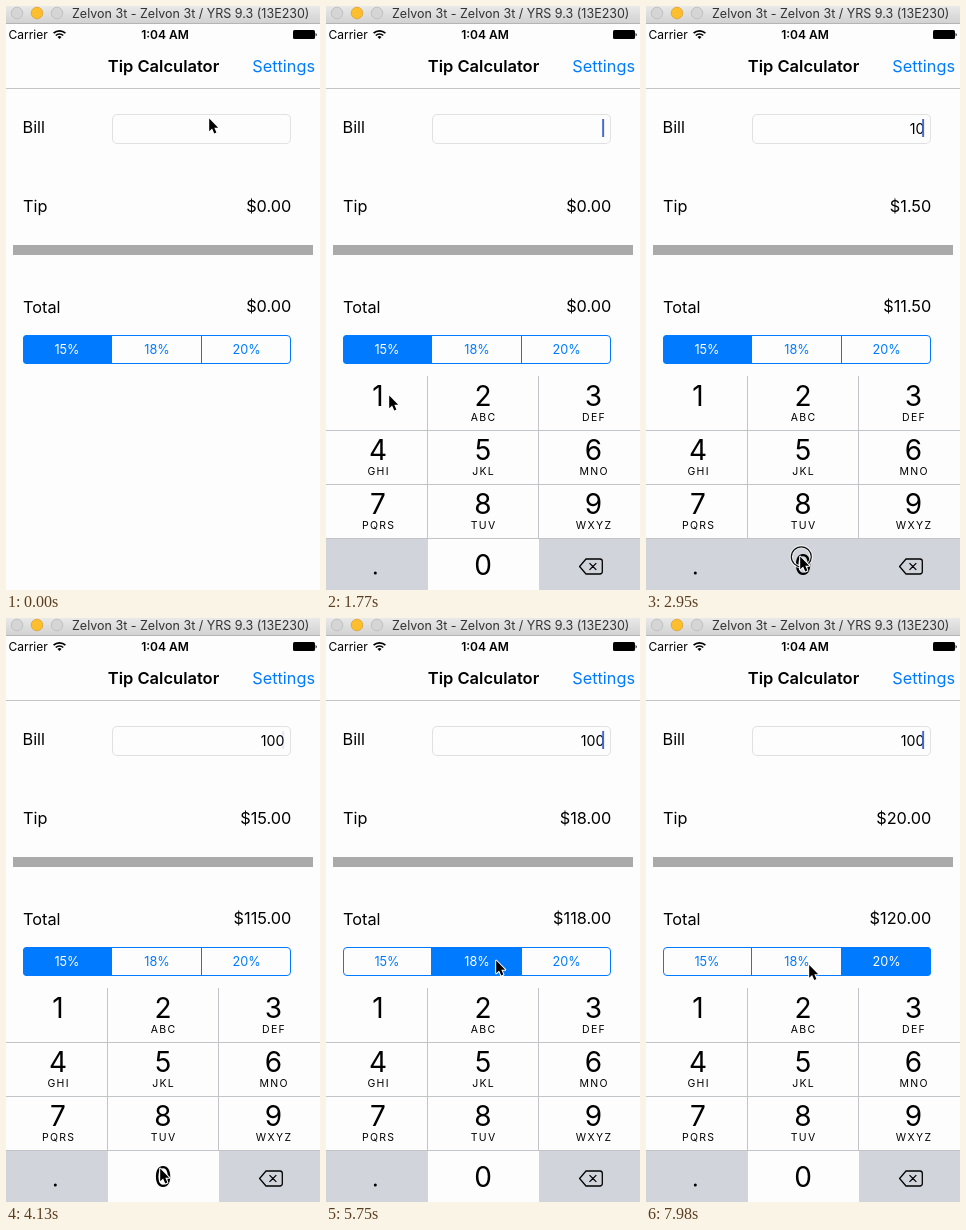
An HTML page for the animation above (8000 ms loop, 314 by 584 pixels).

```html
<!DOCTYPE html>
<html lang="en">
<head>
<meta charset="utf-8">
<title>Tip Calculator</title>
<style>
  html, body { margin: 0; width: 100%; height: 100%; overflow: hidden; background: #fdfdfd; }
  svg { display: block; width: 314px; height: 584px; }
  text { font-family: Inter, Roboto, sans-serif; font-size: 16.3px; fill: #000; white-space: pre; }
  .right { text-anchor: end; }
  .mid, .digit, .abc, .seg { text-anchor: middle; }
  .digit { font-size: 28px; }
  .abc { font-size: 10.5px; letter-spacing: 1.3px; }
  .seg { font-size: 12.7px; }
</style>
</head>
<body>
<svg id="stage" viewBox="0 0 314 584" xmlns="http://www.w3.org/2000/svg">
  <defs>
    <linearGradient id="chrome" x2="0" y2="1">
      <stop offset="0" stop-color="#e9e9e9"/><stop offset="1" stop-color="#d2d2d2"/>
    </linearGradient>
    <clipPath id="segClip"><rect x="17" y="329" width="268" height="29" rx="4"/></clipPath>
  </defs>
  <rect width="314" height="584" fill="#fdfdfd"/>

  <!-- window bar -->
  <rect width="314" height="17" fill="url(#chrome)"/>
  <rect y="17" width="314" height="1" fill="#b4b4b4"/>
  <g stroke-width=".8">
    <circle cx="11" cy="7" r="5.8" fill="#d5d5d5" stroke="#bcbcbc"/>
    <circle cx="31" cy="7" r="5.8" fill="#fdbf2d" stroke="#e0a32a"/>
    <circle cx="51" cy="7" r="5.8" fill="#d5d5d5" stroke="#bcbcbc"/>
  </g>
  <text x="66" y="12" style="font-size:12.5px;fill:#333">Zelvon 3t - Zelvon 3t / YRS 9.3 (13E230)</text>

  <!-- status bar -->
  <text x="2.5" y="32.5" style="font-size:12px">Carrier</text>
  <g fill="none" stroke="#000" stroke-width="1.7">
    <path d="M47.6 27.2a8.4 8.4 0 0 1 11.8 0M49.8 29.5a5.3 5.3 0 0 1 7.4 0"/>
    <path d="M53.5 33l-2-2.1a2.9 2.9 0 0 1 4 0z" fill="#000" stroke="none"/>
  </g>
  <text class="mid" x="159" y="32.5" style="font-size:12px;font-weight:600">1:04 AM</text>
  <rect x="287" y="24" width="22" height="9" rx="1.5"/>
  <path d="M309.6 27v3.6a2 2 0 0 0 0-3.6z"/>

  <!-- navigation -->
  <text class="mid" x="157.5" y="66" style="font-size:16.5px;font-weight:600">Tip Calculator</text>
  <text class="right" x="309" y="66" style="fill:#007aff">Settings</text>
  <rect y="82" width="314" height="1" fill="#c4c4c4"/>

  <!-- form -->
  <text x="16.5" y="127">Bill</text>
  <text x="17" y="206.3">Tip</text>
  <text x="17" y="307.3">Total</text>
  <rect x="106.5" y="108.5" width="178" height="29" rx="4.5" fill="none" stroke="#e1e1e1"/>
  <text id="bill" class="right" x="278.5" y="127.6" style="font-size:14.2px"></text>
  <rect id="caret" x="276.2" y="113" width="1.9" height="18" fill="#4067d6"/>
  <text id="tip" class="right" x="285.3" y="206.3"></text>
  <text id="total" class="right" x="285.3" y="306.3"></text>
  <rect x="7" y="239" width="300" height="10" fill="#aaa"/>

  <!-- rate picker -->
  <rect id="chosen" y="329" height="29" fill="#007aff" clip-path="url(#segClip)"/>
  <g fill="none" stroke="#007aff">
    <rect x="17.5" y="329.5" width="267" height="28" rx="3.5"/>
    <path d="M105.5 329v29M195.5 329v29"/>
  </g>
  <g id="segs"></g>

  <g id="pad"></g>

  <g id="mouse">
    <g id="ring" fill="none">
      <circle cx="2.3" cy="1.8" r="10" stroke="#fff" stroke-width="3" opacity=".8"/>
      <circle cx="2.3" cy="1.8" r="10" stroke="#111" stroke-width="1.2"/>
    </g>
    <path d="M1.2 1.6V14.2L4.1 11.5L6.3 16.5L8.4 15.6L6.3 10.7H10.2Z" stroke="#fff" stroke-width="2"
      paint-order="stroke" stroke-linejoin="round"/>
  </g>
</svg>
<script>
const LOOP = 8000, TICK = 147.6;
const KEY_X = [0, 102, 213, 314], KEY_MID = [52, 157, 267.5];
const SEG_X = [17, 106, 195, 285], SEG_MID = [61, 151, 240.5];
const RATES = [15, 18, 20];
const LETTERS = ['', 'ABC', 'DEF', 'GHI', 'JKL', 'MNO', 'PQRS', 'TUV', 'WXYZ'];

// pointer stops: tick, x, y
const PATH = [
  [0, 202, 111], [1, 210, 115.5], [7, 210, 115.5], [12, 62, 388], [15, 62, 388],
  [18, 153, 549], [28, 153, 549], [35, 169, 341], [41, 169, 341],
  [45, 240, 338], [50, 240, 338], [54, 162, 345.5]
];
// button held: first tick, end tick, key pressed
const CLICKS = [[3, 5], [13, 15, 1], [19, 21, 0], [23, 24, 0], [36, 38], [47, 49]];
const BILLS = [[0, ''], [13, '1'], [19, '10'], [23, '100']];
const PICKS = [[0, 0], [37, 1], [48, 2]];
// caret restarts, in ms
const CARETS = [500, 1919, 2804, 3395];

const $ = id => document.getElementById(id);
const NS = 'http://www.w3.org/2000/svg';
function add(parent, tag, attrs, text = '') {
  const el = document.createElementNS(NS, tag);
  for (const name in attrs) el.setAttribute(name, attrs[name]);
  el.textContent = text;
  return parent.appendChild(el);
}
const latest = (steps, k) => steps.filter(s => s[0] <= k).pop()[1];
const clamp = v => Math.max(0, Math.min(1, v));

const keys = {};
function buildPad() {
  const pad = $('pad');
  for (let i = 0; i < 12; i++) {
    const col = i % 3, row = (i - col) / 3, y = 370 + row * 54;
    const name = i < 9 ? i + 1 : ['.', 0, 'del'][col];
    const idle = name === '.' || name === 'del' ? '#d1d4db' : '#fdfdfd';
    const box = add(pad, 'rect', { x: KEY_X[col], y, width: KEY_X[col + 1] - KEY_X[col], height: 55, fill: idle });
    keys[name] = { box, idle };
    if (name === 'del') {
      add(pad, 'path', {
        d: 'M260 553H274a2.3 2.3 0 0 1 2.3 2.3V565.7a2.3 2.3 0 0 1-2.3 2.3H260L253.6 560.5ZM263.5 557.1l6.8 6.8M270.3 557.1l-6.8 6.8',
        fill: 'none', stroke: '#000', 'stroke-width': 1.3, 'stroke-linejoin': 'round'
      });
    } else if (name === '.') {
      add(pad, 'circle', { cx: 49.3, cy: 567, r: 1.5 });
    } else {
      add(pad, 'text', { class: 'digit', x: KEY_MID[col], y: row < 3 ? y + 29.7 : 569.2 }, name);
    }
    if (LETTERS[i]) add(pad, 'text', { class: 'abc', x: KEY_MID[col] + .6, y: y + 45 }, LETTERS[i]);
  }
  add(pad, 'path', {
    d: 'M0 424.5H314M0 478.5H314M0 532.5H314M101.5 370V532M212.5 370V532',
    fill: 'none', stroke: '#c3c4c7'
  });
}

const labels = RATES.map((r, i) => add($('segs'), 'text', { class: 'seg', x: SEG_MID[i], y: 348 }, r + '%'));
buildPad();

function pointer(k) {
  const i = PATH.findIndex(p => p[0] >= k);
  if (i < 1) return PATH[0].slice(1);
  const [a, ax, ay] = PATH[i - 1], [b, bx, by] = PATH[i];
  const u = (k - a) / (b - a), e = u * u * (3 - 2 * u);
  return [ax + (bx - ax) * e, ay + (by - ay) * e];
}

function caretAlpha(ms) {
  const start = CARETS.filter(c => c <= ms).pop();
  if (start === undefined) return 0;
  const p = ms - start - 600;
  if (p < 0) return 1;
  const q = p % 1000;
  return q < 500 ? 1 - clamp(q / 160) : clamp((q - 500) / 160);
}

function draw(t) {
  const k = Math.floor((t + 10) / TICK);

  const [x, y] = pointer(k);
  $('mouse').setAttribute('transform', `translate(${x.toFixed(1)} ${y.toFixed(1)})`);
  const click = CLICKS.find(c => k >= c[0] && k < c[1]);
  $('ring').style.display = click ? '' : 'none';
  for (const name in keys) {
    const down = click && String(click[2]) === name;
    keys[name].box.setAttribute('fill', down ? '#d1d4db' : keys[name].idle);
  }

  const drop = k < 4 ? 220 : Math.round(214 * Math.exp(-(k - 3.4) * 1.8));
  $('pad').setAttribute('transform', `translate(0 ${drop})`);

  const bill = latest(BILLS, k), pick = latest(PICKS, k);
  const tip = bill * RATES[pick] / 100;
  $('bill').textContent = bill;
  $('tip').textContent = '$' + tip.toFixed(2);
  $('total').textContent = '$' + (+bill + tip).toFixed(2);
  $('caret').setAttribute('opacity', caretAlpha(k * TICK));

  $('chosen').setAttribute('x', SEG_X[pick]);
  $('chosen').setAttribute('width', SEG_X[pick + 1] - SEG_X[pick]);
  labels.forEach((el, i) => { el.style.fill = i === pick ? '#fff' : '#007aff'; });
}

const begin = performance.now();
function frame() {
  draw((performance.now() - begin) % LOOP);
  requestAnimationFrame(frame);
}
frame();
</script>
</body>
</html>
```
